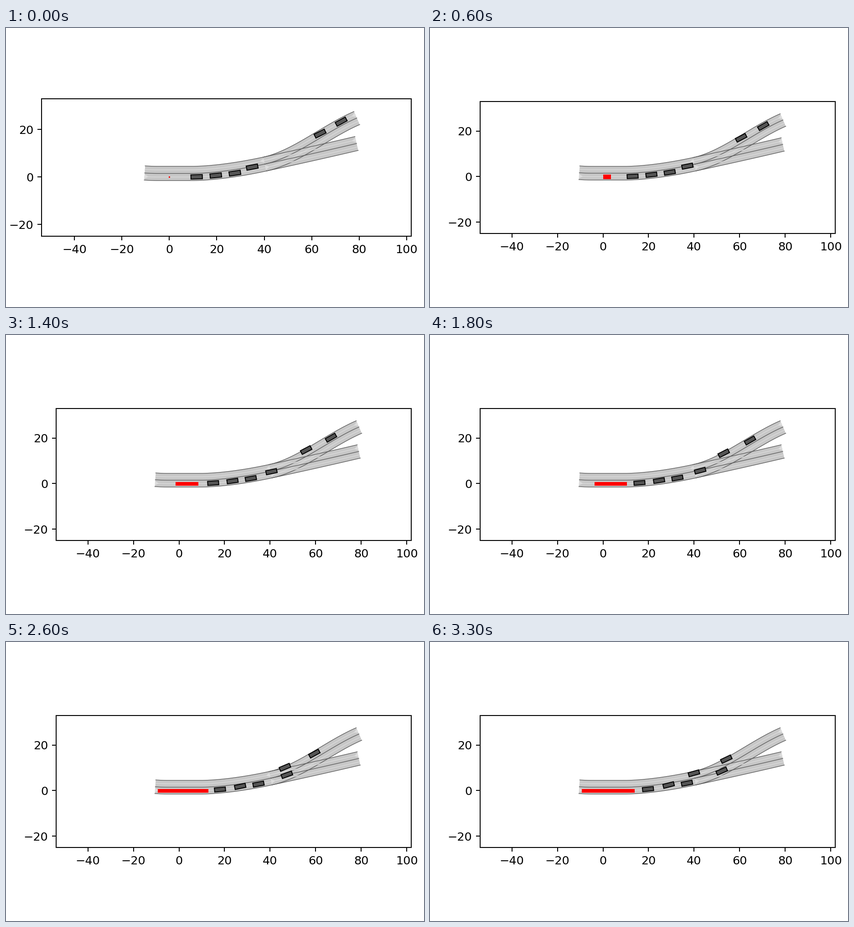
A matplotlib script for the animation above (3400 ms loop, 917 by 611 pixels).

```python
from math import atan, cos, exp, sin

import numpy as np
import matplotlib.pyplot as plt
from matplotlib.animation import FuncAnimation
from matplotlib.patches import Polygon, Rectangle

W, H, DPI = 917, 611, 183.4
FRAMES, INTERVAL = 34, 100
XLIM, YLIM = (-53.85, 102.0), (-25, 33)
LANE = 3.0
CAR_LENGTH, CAR_WIDTH = 4.8, 1.8

# Each road runs from x0 to x1; branches end at (x, y, slope).
START, FORK, FORK_SLOPE = -10.4, 40.2, .215
LEFT = (79, 24.8, .43)
RIGHT = (78.9, 14.1, .235)


def trunk(x):
    ramp = np.clip((-5 - x) / 5.4, 0, None)
    bend = np.clip(x - 10, 0, None)
    return 1.5 + .2 * ramp ** 2 + .01424 * bend ** 1.65


def branch(x, end):
    """Cubic from the fork to the end point with matching slopes."""
    x1, y1, slope = end
    y0, dx = trunk(FORK), x1 - FORK
    u = (x - FORK) / dx
    return (y0 + (y1 - y0) * u * u * (3 - 2 * u)
            + dx * u * (1 - u) * (FORK_SLOPE * (1 - u) - slope * u))


def divider(x, end):
    return trunk(x) if x < FORK else branch(x, end)


def sample(curve, x0, x1, *args):
    x = np.linspace(x0, x1, 40)
    return np.column_stack([x, curve(x, *args)])


def offset(points, d):
    t = np.gradient(points, axis=0)
    t /= np.hypot(t[:, 0], t[:, 1])[:, None]
    return points + d * np.column_stack([-t[:, 1], t[:, 0]])


def draw_road(points):
    top, bottom = offset(points, LANE), offset(points, -LANE)
    ax.add_patch(Polygon(np.vstack([top, bottom[::-1]]), fc="#c7c7c7",
                         ec="none", zorder=1))
    for k in range(-2, 3):
        color = "#dddddd" if k % 2 else "#555555"
        ax.plot(*offset(points, k * LANE / 2).T, color=color, lw=.5, zorder=3)


def draw_arrow(line, size=.9):
    """Triangle at the first point of a lane, pointing along it."""
    u = line[1] - line[0]
    u = u / np.hypot(*u)
    n = np.array([-u[1], u[0]])
    ax.add_patch(Polygon([line[0] + n * size, line[0] + 2 * size * u,
                          line[0] - n * size],
                         fc="#dddddd", ec="none", zorder=4))


class Car:
    """Accelerates along a road while its distance to the divider drifts."""

    def __init__(self, x, speed, accel, side, drift=0, swerve=0, road=LEFT):
        self.motion = x, speed, accel
        self.lateral = side, drift, swerve
        self.road = road
        self.patch = ax.add_patch(Polygon(np.zeros((4, 2)), fc="#555555",
                                          ec="black", lw=.8, zorder=6,
                                          joinstyle="miter"))

    def move(self, i):
        x0, speed, accel = self.motion
        side, drift, swerve = self.lateral
        x = x0 + speed * i + accel * i * i
        u = i / (FRAMES - 1)
        y = divider(x, self.road) + side + drift * u + swerve * u ** 3

        slope = divider(x + .5, self.road) - divider(x - .5, self.road)
        slide = ((drift + 3 * swerve * u * u) / (FRAMES - 1)
                 / (speed + 2 * accel * i))
        a = atan(slope + slide / 2)
        rot = np.array([[cos(a), sin(a)], [-sin(a), cos(a)]])
        box = np.array([(-1, -1), (1, -1), (1, 1), (-1, 1)])
        self.patch.set_xy(box * (CAR_LENGTH / 2, CAR_WIDTH / 2) @ rot + (x, y))


def grow_area(i):
    """Reachable area: late braking behind, saturating reach ahead."""
    x0 = max(-.3 + .6 * min(i, 1) - .00068 * i ** 3, -9.4)
    x1 = .4 + 14.1 * (1 - exp(-(i / 15.5) ** 1.5))
    pulse = (i / 6 * exp(1 - i / 6)) ** 3
    half = .3 + .5 * (1 - exp(-i / 3)) + .3 * pulse
    area.set_bounds(x0, -.08 - half, x1 - x0, 2 * half)


def place_axes(left, right=889.4):
    height = (right - left) * (YLIM[1] - YLIM[0]) / (XLIM[1] - XLIM[0])
    ax.set_position([left / W, .5 - height / 2 / H,
                     (right - left) / W, height / H])


plt.rcParams["font.family"] = "DejaVu Sans"
fig = plt.figure(figsize=((W + .01) / DPI, (H + .01) / DPI), dpi=DPI,
                 facecolor="white")
ax = fig.add_axes([.1, .2, .8, .5])

roads = [sample(trunk, START, FORK), sample(branch, FORK, LEFT[0], LEFT),
         sample(branch, FORK, RIGHT[0], RIGHT)]
for road in roads:
    draw_road(road)
    draw_arrow(offset(road, -LANE / 2))
    draw_arrow(offset(road, LANE / 2)[::-1])

cars = [
    Car(11.5, .25, 0, -1.45),
    Car(19.56, .28, 0, -1.45, swerve=.6),
    Car(27.6, .28, 0, -1.5),
    Car(34.9, .32, .0061, -.2, swerve=-1.17),
    Car(63.5, -.428, -.0087, 1.86, drift=2.65, swerve=-2.3),
    Car(72.4, -.298, -.00776, 1.73, swerve=1.07),
]
area = ax.add_patch(Rectangle((0, 0), 0, 0, fc="red", ec="none", zorder=5))
ax.set(xlim=XLIM, ylim=YLIM, xticks=range(-40, 101, 20), yticks=(-20, 0, 20))


def update(i):
    # The margins settle after the first picture.
    place_axes(78 if i == 0 else 110.3)
    for car in cars:
        car.move(i)
    grow_area(i)
    return [car.patch for car in cars] + [area]


anim = FuncAnimation(fig, update, frames=FRAMES, interval=INTERVAL,
                     init_func=lambda: update(0), repeat=True, repeat_delay=0)
plt.show()
```
